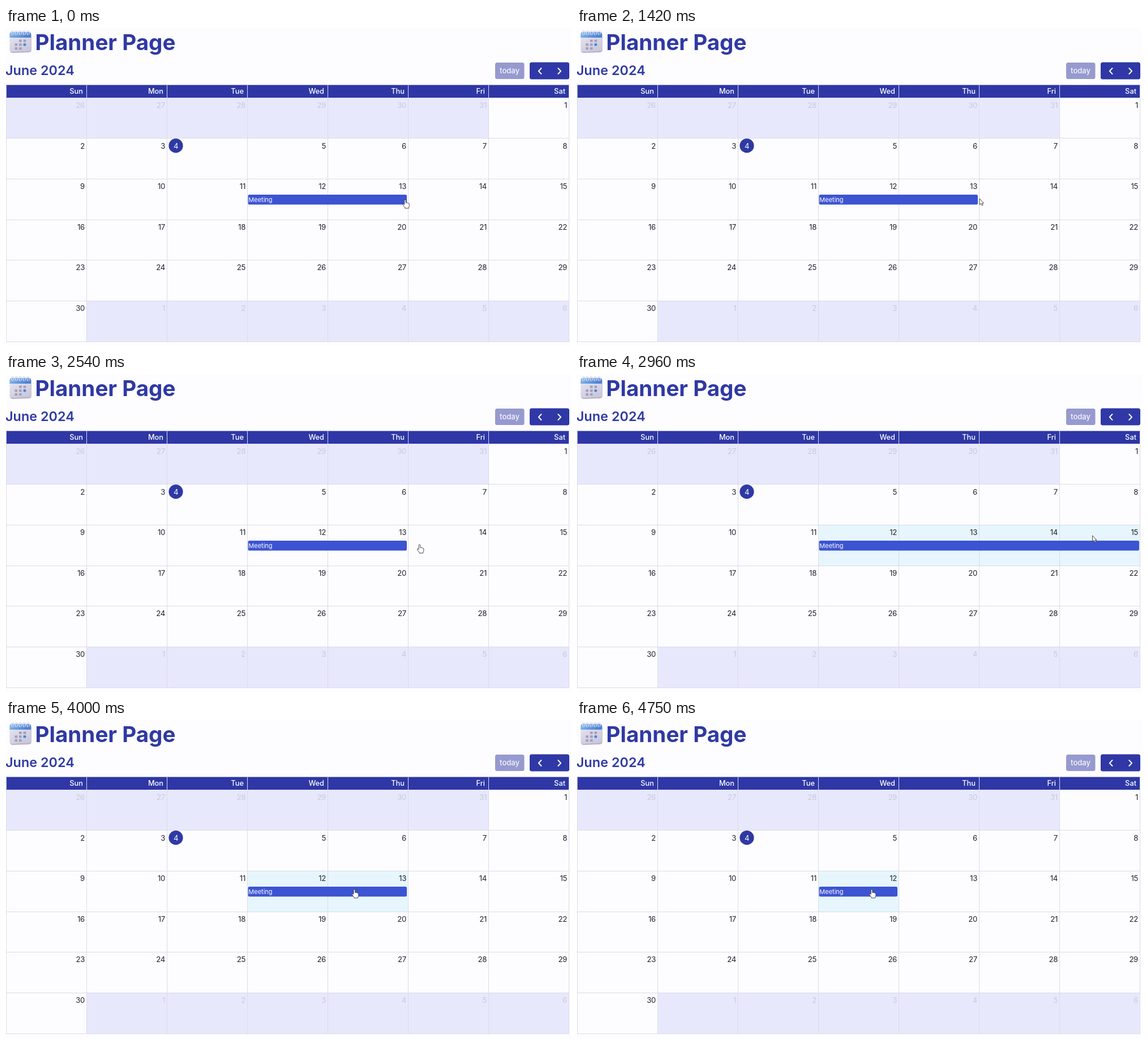
Recreate the animation shown at these times as an HTML page. Size 998x561 px, loop 4790 ms.

```html
<!DOCTYPE html>
<html lang="en">
<head>
<meta charset="utf-8">
<title>Planner Page</title>
<style>
  html, body { margin: 0; width: 100%; height: 100%; overflow: hidden; background: #fdfdff; }
  svg { display: block; width: 998px; height: 561px; font-family: Inter, "Open Sans", sans-serif; }
  text { white-space: pre; }
  .brand { fill: #2f39a4; }
  .title { font-size: 38.6px; font-weight: 700; }
  .month { font-size: 23.4px; font-weight: 600; }
  .head { font-size: 12.8px; font-weight: 500; fill: #fff; text-anchor: end; }
  .day { font-size: 13.2px; letter-spacing: -.3px; fill: #20202c; text-anchor: end; }
  .other { fill: #c7c9db; }
  .today { fill: #fff; text-anchor: middle; }
  .grid { stroke: #dadbe9; fill: none; }
</style>
</head>
<body>
<svg viewBox="0 0 998 561">
  <defs>
    <linearGradient id="cover" x2="1" y2=".4">
      <stop stop-color="#8fc0ee"/>
      <stop offset="1" stop-color="#4b82d6"/>
    </linearGradient>
    <linearGradient id="paper" x2=".6" y2="1">
      <stop stop-color="#e9e8f3"/>
      <stop offset="1" stop-color="#cbc8dc"/>
    </linearGradient>
  </defs>

  <g id="icon">
    <path d="M10 9H41Q45 9 45 13V38Q45 42 41 43L12 44Q7 44 7 39V13Q7 9 10 9Z" fill="#b9b3cd"/>
    <path d="M10 8H40Q44 8 44 12L45 37Q45 40 41 40.500L11 42Q6.500 42 6.500 38V12Q6.500 8 10 8Z" fill="url(#paper)"/>
    <path d="M10 7H40Q44 7 44 11V17H6.500V11Q6.500 7 10 7Z" fill="url(#cover)"/>
  </g>

  <text class="brand title" x="51.500" y="38.500">Planner Page</text>
  <text class="brand month" x="-1" y="83">June 2024</text>

  <rect x="864" y="61" width="51.500" height="29" rx="3.500" fill="#969acf"/>
  <text x="889.500" y="80" font-size="13" font-weight="500" fill="#f6f6fd" text-anchor="middle">today</text>
  <rect x="925" y="60.500" width="70" height="30" rx="3.500" fill="#2f38a6"/>
  <path d="M945.500 71L940.800 76L945.500 81M975.300 71L980 76L975.300 81" fill="none" stroke="#fff" stroke-width="1.900" stroke-linecap="round" stroke-linejoin="round"/>

  <g id="fills"></g>
  <rect id="glow" x="426" y="266.500" height="71.500" fill="#e6f6fc"/>
  <g id="lines"></g>
  <g id="labels"></g>

  <rect id="bar" x="427.500" y="294" height="17.500" rx="2.500" fill="#3c53d2"/>
  <text x="428.300" y="307" font-size="11" fill="#fff">Meeting</text>

  <g id="pointer" stroke="#33333b" stroke-width=".9" fill="#fff" stroke-linejoin="round">
    <path id="arrow" d="M0 0V10.800L2.500 8.600L4.200 12.300L6 11.500L4.400 8H7.500Z"/>
    <path id="hand" d="M-1.300 1.200Q-1.300 0 0 0T1.400 1.200V5.400Q2.500 4.500 3.600 5.700Q4.900 5 5.700 6.400Q7.400 6 7.400 7.800V10.500Q7.400 12.200 6.300 13.200V15H-.4V13.600Q-2 12.200-3.500 9.500Q-4.500 7.700-3.500 7.300Q-2.500 6.900-1.300 8.500Z"/>
  </g>
</svg>
<script>
const LOOP = 4790;
const COL = 142;
const COLS = 7;
const ROWS = [123, 194.5, 266.5, 338, 409.5, 481.5, 553];
const DRAG_START = 2590;
const $ = id => document.getElementById(id);

function add(parent, tag, attrs, text = '') {
  const el = document.createElementNS('http://www.w3.org/2000/svg', tag);
  for (const key in attrs) el.setAttribute(key, attrs[key]);
  el.textContent = text;
  return $(parent).appendChild(el);
}

// Page squares on the icon
for (let i = 1; i < 8; i++) {
  add('icon', 'rect', {
    x: 15.5 + i % 3 * 7.6, y: 20.5 + Math.floor(i / 3) * 6.8,
    width: 4.6, height: 4.2, rx: .8, fill: i === 5 ? '#3e86d8' : '#a29fba'
  });
}
// Binder rings
for (let i = 0; i < 5; i++) {
  add('icon', 'path', {
    d: `M${11 + i * 6.8} 12q-3-7 .5-7t2 6`,
    fill: 'none', stroke: '#d8d9e8', 'stroke-width': 1.5, 'stroke-linecap': 'round'
  });
}

// Calendar grid
add('fills', 'rect', { x: 0, y: 100.5, width: 995, height: 22.5, fill: '#2e37a5' });
add('fills', 'rect', { x: 0, y: ROWS[0], width: 6 * COL, height: 71.5, fill: '#e8e8fd' });
add('fills', 'rect', { x: COL, y: ROWS[5], width: 995 - COL, height: 71.5, fill: '#e8e8fd' });
for (const y of ROWS.slice(1)) {
  add('lines', 'path', { class: 'grid', d: `M0 ${Math.floor(y) + .5}H995` });
}
for (let c = 0; c <= COLS; c++) {
  add('lines', 'path', { class: 'grid', d: `M${c * COL + .5} 100.500V553` });
}

['Sun', 'Mon', 'Tue', 'Wed', 'Thu', 'Fri', 'Sat'].forEach((name, c) =>
  add('labels', 'text', { class: 'head', x: (c + 1) * COL - 6, y: 116.3 }, name));

add('labels', 'circle', { class: 'brand', cx: 300, cy: 207.7, r: 12.6 });
for (let i = 0; i < 42; i++) {
  const n = i - 5;
  const label = n < 1 ? n + 31 : n > 30 ? n - 30 : n;
  const kind = n === 4 ? 'today' : n < 1 || n > 30 ? 'other' : '';
  add('labels', 'text', {
    class: 'day ' + kind,
    x: n === 4 ? 300 : (i % COLS + 1) * COL - 3,
    y: 141 + Math.floor(i / COLS) * 71.6
  }, label);
}

// Pointer tip: time, x, y
const PATH = [
  [0, 705, 303], [1170, 705, 303], [1400, 711, 301], [1600, 711, 301],
  [1750, 706, 302], [2420, 706, 302], [2540, 730, 301], [2960, 910.5, 285],
  [3200, 925, 284], [3400, 915, 286], [3670, 780.5, 293], [4000, 615.5, 299],
  [4300, 550, 299], [4750, 520.5, 299], [LOOP, 520.5, 299]
];

function tipAt(t) {
  const i = PATH.findIndex(p => p[0] > t);
  const [t0, x0, y0] = PATH[i - 1];
  const [t1, x1, y1] = PATH[i];
  const k = (t - t0) / (t1 - t0);
  return [x0 + (x1 - x0) * k, y0 + (y1 - y0) * k];
}

function draw(now) {
  const t = now % LOOP;
  const [x, y] = tipAt(t);
  const dragging = t >= DRAG_START;
  const end = dragging ? Math.floor(x / COL) + 1 : 5;
  const edge = end * COL - 2;
  const pressing = t > 1750 && !dragging;
  const onBar = pressing || (x < edge && y > 294);

  $('bar').setAttribute('width', edge - 427.5 + (end === COLS ? 1 : 0));
  $('glow').setAttribute('width', (end - 3) * COL);
  $('glow').style.display = dragging ? '' : 'none';
  $('arrow').style.display = onBar ? 'none' : '';
  $('hand').style.display = onBar ? '' : 'none';
  $('pointer').setAttribute('transform', `translate(${x} ${y})`);
}

function tick() {
  draw(performance.now());
  requestAnimationFrame(tick);
}
tick();
</script>
</body>
</html>
```
